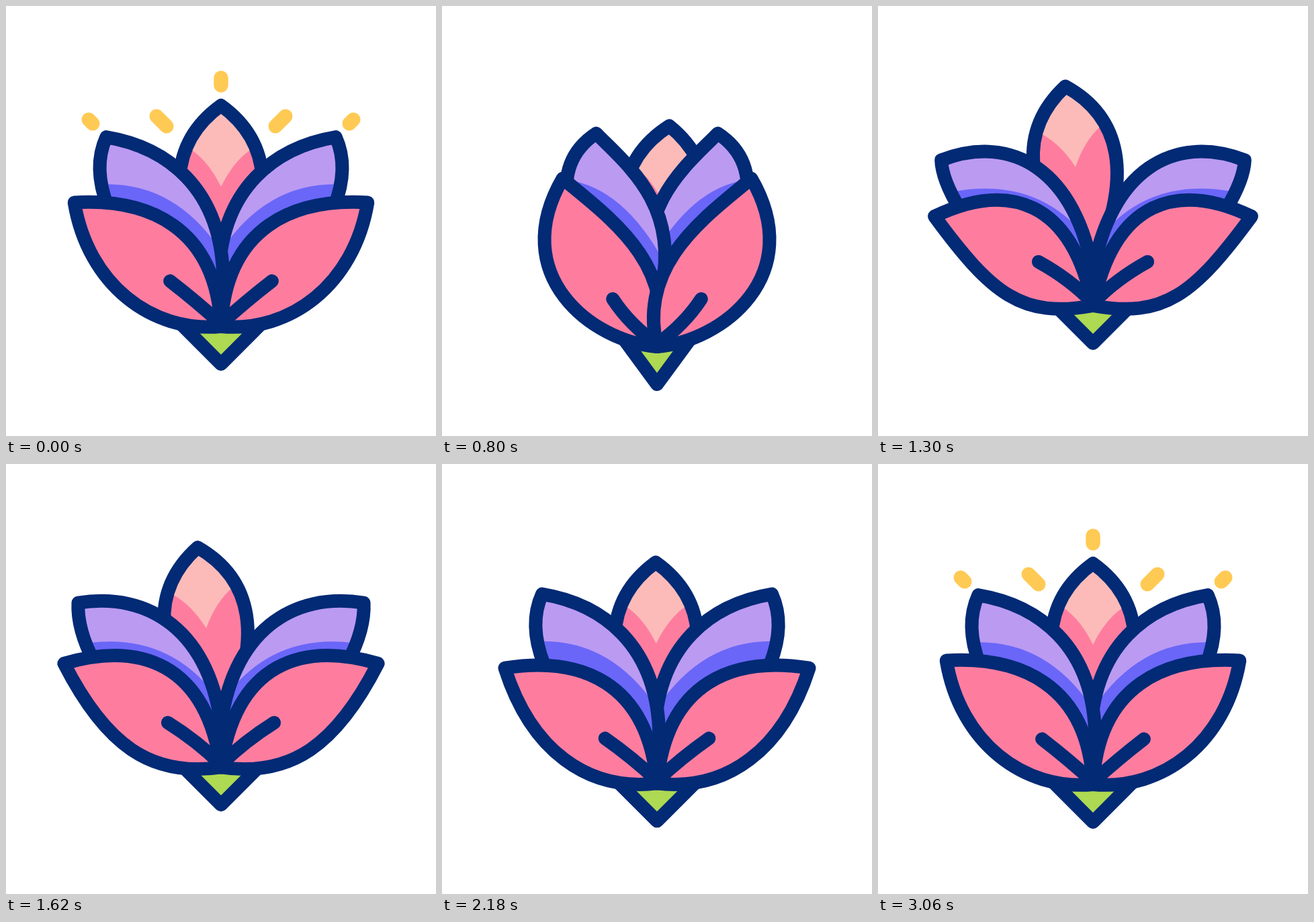
These frames come from a looping animation (640x640 px, 3600 ms). An HTML page with a canvas:

```html
<!DOCTYPE html>
<html lang="en">
<head>
<meta charset="utf-8">
<title>Lotus</title>
<style>
  html, body { margin: 0; width: 100%; height: 100%; overflow: hidden; background: #fff; }
  canvas { display: block; }
</style>
</head>
<body>
<canvas id="stage" width="640" height="640"></canvas>
<script>
const ctx = document.getElementById('stage').getContext('2d');
const LOOP = 3600, STEP = 20;
const NAVY = '#022a75', PINK = '#fe7d9f', PEACH = '#fcbbb8', LILAC = '#bb9af2',
      VIOLET = '#6a66f8', LIME = '#aed952', GOLD = '#ffca54';

// time, height of the base, then angles: front petals, side petals, lean of the middle petal
const keys = [
  [0,    477, 49.8, 31.2, 0],
  [500,  504, 31.4, 13.9, -3.5],
  [800,  507, 29.3, 15.9, -3.2],
  [1300, 446, 60.6, 46.2, 7.2],
  [1640, 452, 56,   40.3, 5.9],
  [1940, 467, 44.4, 24.7, 2.3],
  [2160, 475, 52.5, 31,   .4],
  [2460, 477, 54,   32.1, .2],
  [3060, 477, 49.8, 31.2, 0]
];

// Smooth curve through the keys, at rest at both ends
function poseAt(t) {
  const last = keys.length - 1;
  if (t >= keys[last][0]) return keys[last];
  const n = keys.findIndex((key, i) => i < last && keys[i + 1][0] > t);
  const [from, to] = [keys[n], keys[n + 1]];
  const span = to[0] - from[0];
  const u = (t - from[0]) / span, u2 = u * u, u3 = u2 * u;
  const slope = (j, i) => j < 1 || j >= last ? 0 :
    (keys[j + 1][i] - keys[j - 1][i]) / (keys[j + 1][0] - keys[j - 1][0]);
  return from.map((v, i) =>
    v + (3 * u2 - 2 * u3) * (to[i] - v) +
    span * ((u3 - 2 * u2 + u) * slope(n, i) + (u3 - u2) * slope(n + 1, i)));
}

// Points are measured from the base, angles in degrees leftwards from straight up
const rad = deg => deg * Math.PI / 180;
const polar = (r, deg) => [-r * Math.sin(rad(deg)), -r * Math.cos(rad(deg))];
const mix = (a, b, k) => a + (b - a) * k;
// Moves from a closed place to an open one
const swing = (k, r0, deg0, r1, deg1) => polar(mix(r0, r1, k), mix(deg0, deg1, k));
// Tips turn about the base and shorten a little when wide open
const tipAt = (r, deg, open) => polar(r * (1 - .05 * open ** 6), deg);

function fill(path, color) {
  ctx.fillStyle = color;
  ctx.fill(path);
}

function line(path, color = NAVY, width = 20) {
  ctx.strokeStyle = color;
  ctx.lineWidth = width;
  ctx.stroke(path);
}

function fillInside(path, area, color) {
  ctx.save();
  ctx.clip(path);
  fill(area, color);
  ctx.restore();
}

function mirrored(draw, arg) {
  ctx.save();
  ctx.scale(-1, 1);
  draw(arg);
  ctx.restore();
}

function drawStem(angle) {
  const k = Math.min(1, (angle - 30) / 20);
  const x = mix(52, 62, k), y = mix(-14, -6, k);
  const p = new Path2D();
  p.moveTo(-x, y);
  p.lineTo(0, 56);
  p.lineTo(x, y);
  fill(p, LIME);
  line(p);
}

function drawMiddle(lean) {
  ctx.save();
  ctx.rotate(rad(-lean));
  const p = new Path2D();
  p.moveTo(0, -50);
  p.bezierCurveTo(-92, -187, -72, -277, 0, -329);
  p.bezierCurveTo(72, -277, 92, -187, 0, -50);
  fill(p, PINK);

  const light = new Path2D();
  light.moveTo(0, -340);
  light.lineTo(-84, -293);
  light.lineTo(-44, -263);
  light.quadraticCurveTo(-18, -245, 0, -208);
  light.quadraticCurveTo(18, -245, 44, -263);
  light.lineTo(84, -293);
  fillInside(p, light, PEACH);
  line(p);
  ctx.restore();
}

function drawSide(angle) {
  const k = (angle - 14) / 32;
  const tip = tipAt(330, angle, k);
  const p = new Path2D();
  p.moveTo(...swing(k, 247, 31, 244, 54));
  p.quadraticCurveTo(...swing(k, 318, 26, 293, 50), ...tip);
  p.bezierCurveTo(...swing(k, 277, 9, 284, 25), ...swing(k, 217, -9.5, 203, 7),
                  ...swing(k, 94, -5, 46, -1));
  p.lineTo(0, 0);
  fill(p, VIOLET);

  const edge = swing(k, 283, 27, 268, 50.5);
  const light = new Path2D();
  light.moveTo(-320, -400);
  light.lineTo(-320, edge[1]);
  light.lineTo(...edge);
  light.quadraticCurveTo(...swing(k, 244, 11, 210, 24), ...swing(k, 126, -6, 106, 7));
  light.lineTo(100, -120);
  light.lineTo(100, -400);
  fillInside(p, light, LILAC);
  line(p);
}

function drawFront(angle) {
  const k = (angle - 30) / 30;
  const tip = tipAt(287, angle, k);
  const p = new Path2D();
  p.moveTo(...tip);
  p.bezierCurveTo(...swing(k, 213, 22, 224, 34), ...swing(k, 130, -13, 160, 11), 0, 0);
  p.bezierCurveTo(...swing(k, 98, 86, 107, 100), ...swing(k * k, 248, 64.4, 155, 83), ...tip);
  p.closePath();
  fill(p, PINK);
  line(p);

  const vein = new Path2D();
  vein.moveTo(...swing(k, 97, 43, 104, 51));
  vein.quadraticCurveTo(...swing(k, 52, 51, 52, 41), 0, -4);
  line(vein);
}

// Each ray runs from its inner end outwards
const rays = [[0, 118, 0, 107], [-81, 179, -96, 164], [-191, 175, -197, 169]];

function drawRays(grow) {
  for (const [x, y, x2, y2] of rays) {
    const p = new Path2D();
    p.moveTo(x, y);
    p.lineTo(mix(x, x2, grow), mix(y, y2, grow));
    line(p, GOLD, 21);
  }
}

const ramp = (t, from, to) => Math.min(1, Math.max(0, (t - from) / (to - from)));

function draw(t) {
  const [, base, front, side, lean] = poseAt(t);
  ctx.clearRect(0, 0, 640, 640);
  ctx.lineCap = ctx.lineJoin = 'round';
  ctx.save();
  ctx.translate(320, base);
  drawStem(front);
  drawMiddle(lean);
  mirrored(drawSide, side);
  drawSide(side);
  drawFront(front);
  mirrored(drawFront, front);
  ctx.translate(0, -base);
  const grow = t < 1000 ? 1 - ramp(t, 0, 200) : ramp(t, 2500, 2740);
  if (grow > 0) {
    drawRays(grow);
    mirrored(drawRays, grow);
  }
  ctx.restore();
}

const start = performance.now();
function tick() {
  const t = (performance.now() - start) % LOOP;
  draw(Math.floor(t / STEP) * STEP);
  requestAnimationFrame(tick);
}
tick();
</script>
</body>
</html>
```
